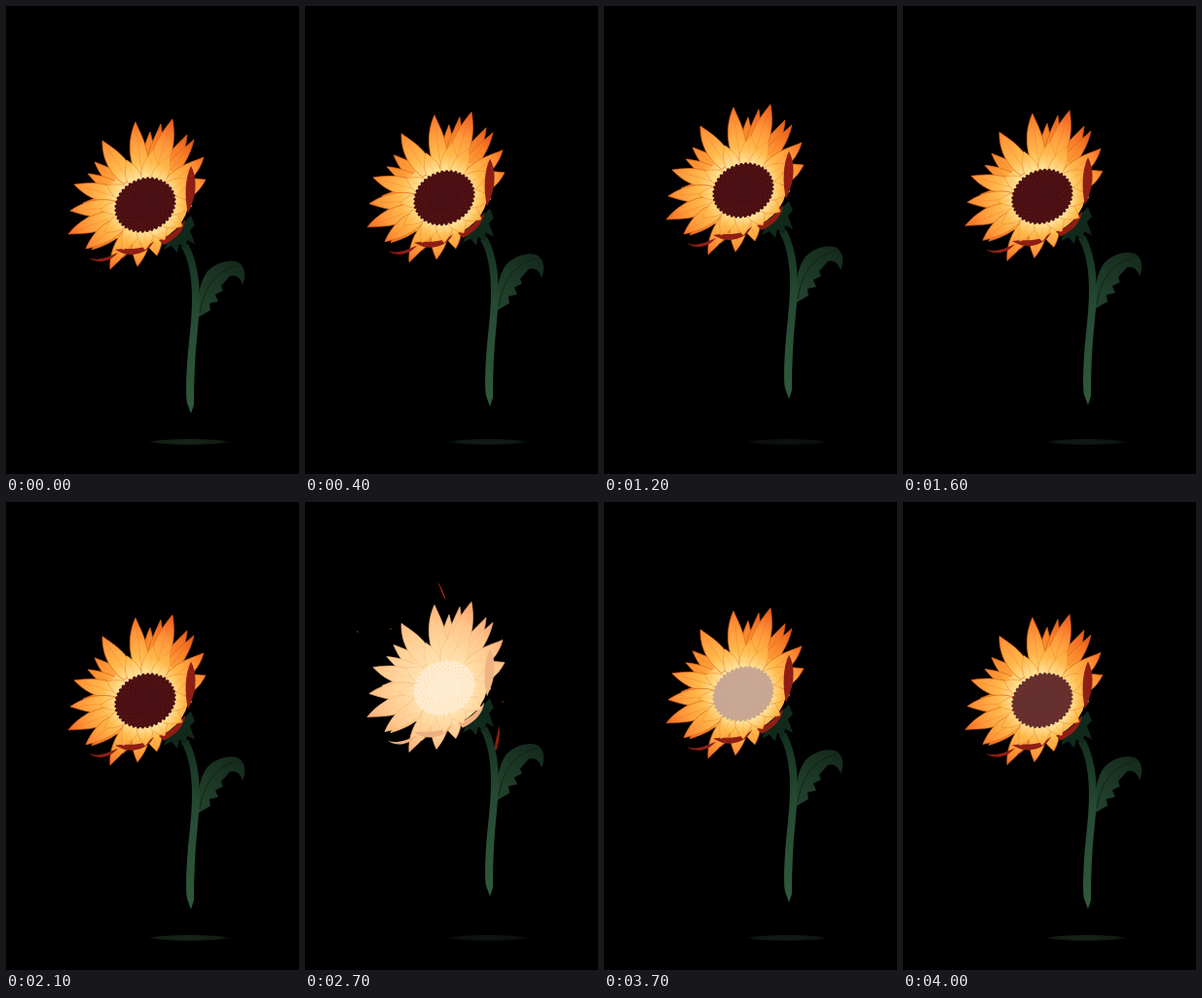
Recreate the animation shown at these times as an HTML page with a canvas. Size 301x480 px, loop 4.1 s.

```html
<!DOCTYPE html>
<html lang="en">
<head>
<meta charset="utf-8">
<title>Glowing sunflower</title>
<style>
html, body { margin: 0; width: 100%; height: 100%; overflow: hidden; background: #000; }
canvas { display: block; width: 301px; height: 480px; }
</style>
</head>
<body>
<canvas id="stage" width="301" height="480"></canvas>
<script>
const ctx = document.getElementById('stage').getContext('2d');
const LOOP = 4100, STEP = 100, BOB = 2050, RISE = 820, HEIGHT = 15;
const CENTER = { x: 143, y: 204 };

const clamp = v => Math.max(0, Math.min(1, v));
const ramp = (t, from, to) => clamp((t - from) / (to - from));
const ease = v => (1 - Math.cos(Math.PI * v)) / 2;
const lerp = (a, b, k) => a + (b - a) * k;
const channels = hex => [1, 3, 5].map(i => parseInt(hex.slice(i, i + 2), 16));
const mix = (a, b, k) => {
  const to = channels(b);
  return `rgb(${channels(a).map((v, i) => Math.round(lerp(v, to[i], k)))})`;
};

// Petals: tip x, tip y, half width, sideways bend
const BACK = [
  [148, 129, 8, 0], [159, 121, 8, 1], [186, 132, 9, 2], [193, 137, 8, 2],
  [91, 160, 9, -1], [84, 172, 8, 0], [79, 202, 9, 0], [80, 220, 9, 0],
  [88, 250, 9, 0], [120, 258, 9, 0]
];
const FRONT = [
  [203, 155, 10, 3], [171, 116, 11, 1], [133, 119, 10, -2], [99, 138, 11, -2],
  [70, 183, 10, -1], [66, 210, 10, 1], [64, 234, 10, 2], [82, 249, 10, 1],
  [107, 270, 9, 2], [135, 267, 10, 0], [155, 256, 11, -1], [205, 178, 12, 2]
];
const INNER = [
  [124, 158, 9, 0], [151, 148, 10, 0], [168, 153, 9, 1], [104, 184, 9, 0],
  [97, 209, 8, 0], [101, 232, 9, 0], [120, 250, 10, 0], [143, 250, 10, 0],
  [163, 240, 11, 0], [181, 226, 11, 0], [191, 205, 11, 0], [188, 177, 10, 0]
];

const STEM = new Path2D('M180 247 C192 267 193 300 189 335 C186 362 184 392 186 407 L190 418 L193 409 C193 383 194 358 197 331 C201 296 199 266 187 244Z');
const LEAF = new Path2D('M198 319 C196 302 198 284 207 272 C216 263 230 259 239 263 C246 268 247 277 243 286 C241 278 235 275 230 277 L221 287 L223 292 L215 296 L218 303 L209 305 L210 312Z');
const LEAF_VEIN = new Path2D('M199 315 C203 292 213 271 239 266');
const CALYX = new Path2D('M190 215 L194 225 L189 230 L194 244 L186 240 L185 249 L178 244 L176 253 L170 246 L162 250 L168 236Z');
const CURLS = [
  'M187 213 C183 196 184 176 190 164 C196 174 196 191 191 203Z',
  'M112 250 C122 247 139 253 152 241 C147 253 132 257 121 254Z',
  'M85 258 C94 262 103 258 115 253 C106 264 92 264 85 258Z',
  'M157 240 C166 238 178 228 184 219 C183 232 171 241 162 245Z'
].map(d => new Path2D(d));

function blade(bx, by, tx, ty, w, bend = 0) {
  const dx = tx - bx, dy = ty - by, len = Math.hypot(dx, dy);
  const nx = -dy / len, ny = dx / len;
  const at = (k, side) => [bx + dx * k + nx * side, by + dy * k + ny * side];
  const path = new Path2D();
  path.moveTo(...at(0, w * 0.6));
  path.bezierCurveTo(...at(0.4, w * 1.25), ...at(0.75, w * 0.6 + bend), tx, ty);
  path.bezierCurveTo(...at(0.75, -w * 0.6 + bend), ...at(0.4, -w * 1.25), ...at(0, -w * 0.6));
  path.closePath();
  return path;
}

function petals(list, fill, edge, start) {
  ctx.lineWidth = 0.7;
  ctx.strokeStyle = edge;
  for (const [x, y, w, bend] of list) {
    const bx = lerp(CENTER.x, x, start), by = lerp(CENTER.y, y, start);
    const shape = blade(bx, by, x, y, w, bend);
    ctx.fillStyle = fill;
    ctx.fill(shape);
    ctx.stroke(shape);
    ctx.globalAlpha = 0.35;
    ctx.beginPath();
    ctx.moveTo(bx, by);
    ctx.lineTo(lerp(bx, x, 0.75), lerp(by, y, 0.75));
    ctx.stroke();
    ctx.globalAlpha = 1;
  }
}

function petalGradient(colors, flash) {
  const g = ctx.createRadialGradient(CENTER.x, CENTER.y, 28, 133, 194, 86);
  const glow = ['#ffe2b0', '#ffd79e', '#ffc68b', '#ff9f68'];
  [0, 0.25, 0.6, 1].forEach((p, i) => g.addColorStop(p, mix(colors[i], glow[i], flash)));
  return g;
}

function disc(light) {
  ctx.save();
  ctx.translate(CENTER.x, CENTER.y);
  ctx.rotate(-0.45);
  ctx.fillStyle = mix('#4a0f12', '#ffecd0', light);
  ctx.beginPath();
  ctx.ellipse(0, 0, 31, 26, 0, 0, 7);
  ctx.fill();
  const dot = (a, r, size) => {
    ctx.beginPath();
    ctx.arc(Math.cos(a) * 31 * r, Math.sin(a) * 26 * r, size, 0, 7);
    ctx.fill();
  };
  for (let i = 0; i < 40; i++) dot(i * Math.PI / 20, 1, 1.6);
  ctx.fillStyle = mix('#64191a', '#fbd8b4', light);
  for (let i = 60; i < 190; i++) dot(i * 2.39996, Math.sqrt(i / 190), 0.7);
  ctx.restore();
}

function greenery() {
  const stem = ctx.createLinearGradient(0, 245, 0, 418);
  stem.addColorStop(0, '#14301f');
  stem.addColorStop(0.4, '#254a33');
  stem.addColorStop(1, '#2f5a3b');
  const leaf = ctx.createLinearGradient(200, 305, 240, 262);
  leaf.addColorStop(0, '#21402b');
  leaf.addColorStop(1, '#14291c');
  ctx.fillStyle = leaf;
  ctx.fill(LEAF);
  ctx.lineWidth = 0.8;
  ctx.strokeStyle = '#0d2015';
  ctx.stroke(LEAF_VEIN);
  ctx.fillStyle = stem;
  ctx.fill(STEM);
  ctx.fillStyle = '#10291b';
  ctx.fill(CALYX);
}

function head(flash, light) {
  const outer = petalGradient(['#ffe39a', '#ffba4c', '#ff9639', '#ef571b'], flash);
  const back = petalGradient(['#ffd27a', '#ffa23a', '#f98029', '#e04c16'], flash);
  const edge = mix('#d9641c', '#f5b57c', flash);
  petals(BACK, back, edge, 0.3);
  ctx.fillStyle = outer;
  ctx.beginPath();
  ctx.ellipse(CENTER.x, CENTER.y, 46, 39, -0.45, 0, 7);
  ctx.fill();
  petals(FRONT, outer, edge, 0.38);
  ctx.fillStyle = mix('#8f1e14', '#eeb080', flash);
  CURLS.slice(1).forEach(c => ctx.fill(c));
  petals(INNER, outer, mix('#ee9438', '#f8c58e', flash), 0.4);
  ctx.fillStyle = mix('#8f1e14', '#f0b484', flash);
  ctx.fill(CURLS[0]);
  disc(light);
}

function shadow(lift) {
  ctx.save();
  ctx.translate(188, 447);
  ctx.scale(1, 0.075);
  const g = ctx.createRadialGradient(0, 0, 0, 0, 0, 42);
  g.addColorStop(0, mix('#17271a', '#0f1314', lift));
  g.addColorStop(0.8, mix('#111d13', '#0b0e0f', lift));
  g.addColorStop(1, '#000000');
  ctx.fillStyle = g;
  ctx.beginPath();
  ctx.arc(0, 0, 42, 0, 7);
  ctx.fill();
  ctx.restore();
}

function embers(t) {
  const visible = (from, to) => ramp(t, from, from + 150) * (1 - ramp(t, to - 200, to));
  const paint = (shape, color, alpha) => {
    ctx.globalAlpha = alpha;
    ctx.fillStyle = color;
    ctx.fill(shape);
    ctx.globalAlpha = 1;
  };
  const k = ramp(t, 2700, 3300), rise = (t - 2700) * 0.06;
  paint(blade(lerp(196, 188, k), lerp(254, 308, k), lerp(199, 209, k), lerp(229, 253, k), lerp(1.8, 7, k), 2),
    mix('#b62a12', '#dd5a22', k), 0.75 * visible(2450, 3600));
  paint(blade(144, 99 - rise, 135, 81 - rise, 0.8, 2), '#a8300f', visible(2450, 2950));
  paint(blade(54, 222, 51, 214, 0.8, -1), '#8a2f12', visible(3050, 3500));
  for (const [x, y] of [[54, 133], [88, 130], [203, 205]]) {
    const spark = new Path2D();
    spark.arc(x, y - rise * 0.5, 0.8, 0, 7);
    paint(spark, '#a83a1a', visible(2450, 3000));
  }
}

function draw(now) {
  const t = Math.floor((now % LOOP) / STEP) * STEP;
  const phase = t % BOB;
  const lift = ease(clamp(Math.min(phase, BOB - phase) / RISE));
  const flash = ease(ramp(t, 2300, 2700)) * (1 - ease(ramp(t, 2750, 3250)));
  const light = ease(ramp(t, 2300, 2700)) * (1 - ease(ramp(t, 3400, 4200)));
  ctx.fillStyle = '#000';
  ctx.fillRect(0, 0, 301, 480);
  shadow(lift);
  ctx.save();
  ctx.translate(0, -HEIGHT * lift);
  greenery();
  head(flash, light);
  ctx.restore();
  embers(t);
}

const start = performance.now();
function tick() {
  draw(performance.now() - start);
  requestAnimationFrame(tick);
}
tick();
</script>
</body>
</html>
```
